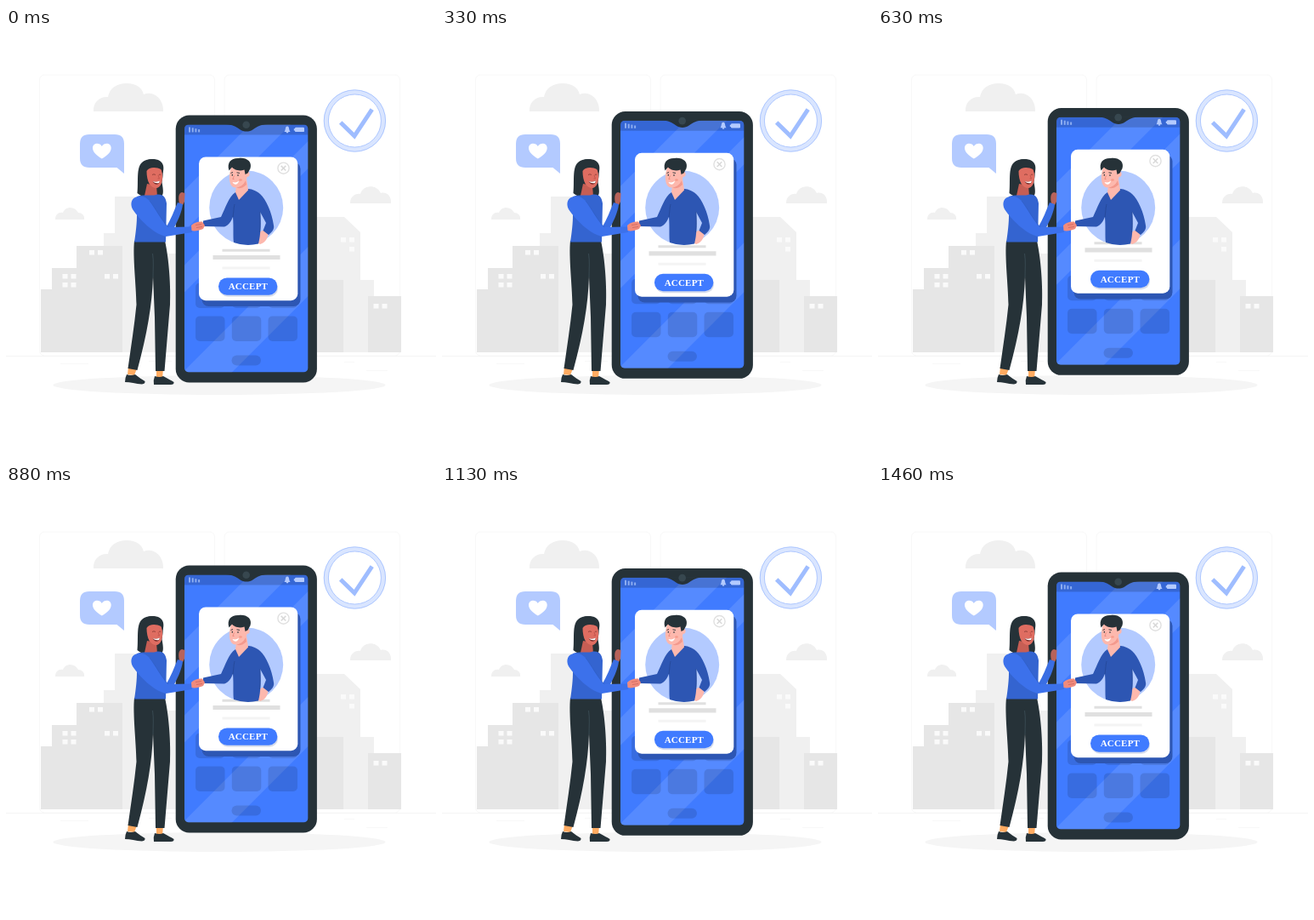
Write an HTML page with a canvas that moves like this. It is 506 by 504 pixels and loops after 1500 ms.

```html
<!DOCTYPE html>
<html lang="en">
<head>
<meta charset="utf-8">
<title>Friend request</title>
<style>
  html, body { margin: 0; width: 100%; height: 100%; overflow: hidden; background: #fff; }
  canvas { display: block; width: 506px; height: 504px; }
</style>
</head>
<body>
<canvas id="stage" width="506" height="504"></canvas>
<script>
const ctx = document.getElementById('stage').getContext('2d');

const LOOP = 1500, STEPS = 36, LIFT = 10, REST = 0.4;
const DARK = '#263238', BLUE = '#407bff', PALE = '#b3caff', NAVY = '#2d56b3';
const GREY = '#e6e6e6', MIST = '#f0f0f0', SKIN = '#fdb8ad', ROSE = '#df6d61';

function fill(path, color) {
  ctx.fillStyle = color;
  ctx.fill(new Path2D(path));
}

function line(path, color, width = 1) {
  ctx.strokeStyle = color;
  ctx.lineWidth = width;
  ctx.stroke(new Path2D(path));
}

function box(x, y, w, h, color, r = 0) {
  ctx.fillStyle = color;
  ctx.beginPath();
  ctx.roundRect(x, y, w, h, r);
  ctx.fill();
}

function oval(x, y, rx, ry, color) {
  ctx.fillStyle = color;
  ctx.beginPath();
  ctx.ellipse(x, y, rx, ry, 0, 0, Math.PI * 2);
  ctx.fill();
}

function ring(x, y, r, color, width) {
  ctx.strokeStyle = color;
  ctx.lineWidth = width;
  ctx.beginPath();
  ctx.arc(x, y, r, 0, Math.PI * 2);
  ctx.stroke();
}

function windows(...spots) {
  for (const [x, y] of spots) box(x, y, 6, 5.5, '#fafafa');
}

function drawCity() {
  for (const [x, w] of [[39.5, 206], [257, 206.5]]) {
    ctx.strokeStyle = '#f8f8f8';
    ctx.lineWidth = 1;
    ctx.beginPath();
    ctx.roundRect(x, 55, w, 330, 6);
    ctx.stroke();
  }

  fill('M103 98C102 88 110 80 120 81C122 70 131 65 142 65C153 65 160 70 162 78C174 73 186 84 185 98Z', MIST);
  fill('M58 225C58 219 62 216 67 217C70 209 81 209 85 217C89 217 93 220 92 225Z', MIST);
  fill('M405 206C405 198 411 194 417 195C420 184 436 183 441 194C448 192 454 198 453 206Z', MIST);

  box(115, 241, 22, 140, MIST);
  box(128, 198, 44, 183, MIST);
  box(172, 265, 38, 116, MIST);
  fill('M41 381V307H54V282H83V256H137V381Z', GREY);
  windows([98, 261], [108, 261], [66.5, 289], [76.5, 289], [66.5, 299], [76.5, 299], [116, 289], [126, 289]);

  fill('M360 381V222H398L417 240V296H433V381Z', MIST);
  box(360, 296, 37, 85, GREY);
  box(426, 315, 39, 66, GREY);
  windows([394, 246], [404, 246], [404, 257], [432.5, 324], [442.5, 324]);

  line('M0 385.5H506', '#f3f3f3', 0.8);
  line('M64 394.5H97M168 391.5H195M398 392.5H410M424 402.5H449', '#f6f6f6', 0.8);
  oval(251, 419.5, 195.5, 11.5, '#f5f5f5');
}

function drawBadges() {
  fill('M98 125H128Q139 125 139 136V171L130.500 164H98Q87 164 87 153V136Q87 125 98 125Z', PALE);
  fill('M112.8 153.6C107 150 102 146 102 141C102 135 110 134 112.8 139C116 134 123.7 135 123.7 141C123.7 146 119 150 112.8 153.6Z', '#fff');

  oval(410.4, 109, 36.5, 36.5, '#d9e5ff');
  oval(410.4, 109, 31, 31, '#fff');
  ring(410.4, 109, 36.2, '#9fbdff', 0.8);
  ring(410.4, 109, 31, '#9fbdff', 0.8);
  line('M393.7 111L410 126.800L430.700 95.700', '#9fbdff', 5);
}

// Diagonal reflection between the lines x + y = from and x + y = to.
function gloss(from, to) {
  fill(`M${from - 100} 100L${to - 100} 100L${to - 410} 410L${from - 410} 410Z`, 'rgba(255,255,255,.11)');
}

function drawPhone() {
  box(199.7, 102.2, 166.2, 313.8, DARK, 16);
  ctx.save();
  ctx.beginPath();
  ctx.roundRect(210, 113, 145.3, 291, 5);
  ctx.clip();
  box(210, 113, 146, 291, BLUE);
  gloss(400, 448);
  gloss(488, 520);
  gloss(612, 670);
  for (const y of [299, 338]) {
    for (const x of [223, 265.8, 308.5]) box(x, y, 34.5, 29.5, 'rgba(0,0,0,.12)', 5);
  }
  box(265.5, 384, 34.5, 12, 'rgba(0,0,0,.12)', 6);
  box(210, 113, 146, 12, 'rgba(0,0,0,.17)');
  ctx.restore();

  fill('M258 112.5C267 113 270 115 275 118.500C280 122 286 122 291 118.500C296 115 299 113 308 112.500Z', DARK);
  oval(282.7, 113.3, 4.3, 4.3, '#37474f');
  for (let i = 0; i < 4; i++) box(215 + i * 3.7, 116 + i * 0.9, 2, 6 - i * 0.9, '#8cacf0');
  fill('M327.3 121.5C329.5 120 328 115 331 115C334 115 332.500 120 334.700 121.500Z', PALE);
  oval(331, 122, 1.3, 0.9, PALE);
  box(340, 116.3, 11, 5.4, PALE, 1.2);
  box(338.8, 117.8, 1.5, 2.4, PALE);

  box(230.5, 157, 116, 169.7, NAVY, 8);
  box(227, 151, 116.3, 168.8, '#fff', 8);
}

function drawCardContent() {
  box(254.5, 259.3, 56, 3, '#e0e0e0');
  box(243.5, 266.5, 79, 5.2, '#e0e0e0');
  box(254.5, 280, 56, 3, '#f4f4f4');

  ring(326.5, 164.3, 6.6, '#e0e0e0', 1.4);
  line('M323.7 161.5L329.3 167.1M329.3 161.5L323.7 167.1', '#d8d8d8', 1.5);

  box(251, 295, 69, 20.3, '#d6dceb', 10);
  box(250, 293, 69.3, 20.3, BLUE, 10);
  ctx.fillStyle = '#fff';
  ctx.font = 'bold 11px "Liberation Serif", serif';
  ctx.letterSpacing = '0.2px';
  ctx.textAlign = 'center';
  ctx.fillText('ACCEPT', 284.9, 306.8);
}

function drawMan() {
  fill('M296 244C297 238 306 236 309 238C309 245 306 252 299 254L295 252Z', SKIN);
  fill('M270 193C262 198 258 212 253 222L232 226.500V233L257 233.500C262 232 265 227 267 222C268 234 267 246 268 252Q282 257 297 253.500C300 243 300 228 299 216L306 229L302.500 238L309 243C313 240 316 236 315 232C313 217 306 201 299 195C293 190 288 189 284 189Z', NAVY);
  line('M267 222C268 215 268 211 269 207M299 216C299 226 299.500 232 298.500 240', '#244793', 0.8);
  fill('M271 184L283 177L285 190.500L274 202L270 193Z', SKIN);
  fill('M271 187.500C277 186.500 280 183 282 179L283 184C279 188 275 189 271 187.500Z', '#f3998d');
  fill('M264 167C261.500 177 263 187 269.500 187.500C277 187.500 283 181 285 170L281 162H266Z', SKIN);
  oval(284.3, 171.8, 2.3, 3, SKIN);
  fill('M262.500 167.500C259.500 158 265 152.500 274 153C283 152 290 157 287.500 165L284.500 170.500L281.500 172L280.500 166.500C274 169 268 166 266 163.500Z', DARK);
  line('M264.500 170.500L267 169.500M271.500 169.800L275 170.500', DARK, 0.9);
  oval(266.300, 172.800, 0.7, 1, DARK);
  oval(273, 173, 0.7, 1, DARK);
  line('M268.500 173.500L266.800 177.500H268.500', '#e88476', 0.8);
  fill('M266.500 181C269.500 182 272 181.500 274 179.500C273.500 184 268.500 185.500 266.500 181Z', '#fff');
  oval(276, 178.500, 1.8, 1.2, '#f79b8c');
}

function drawWoman() {
  fill('M144 398L154 400L151 408L143 407Z', '#ffab61');
  fill('M177 400H185L184 412H177Z', '#ffab61');
  fill('M142 407Q147 409 152 407C156 410 160 413 163.500 415Q164 418 160 418.500C153 418 146 416 140 416Q140 411 142 407Z', DARK);
  fill('M175 409Q181 411 185 409C190 412 195 414 197.500 416Q198 419 194 419H174Q173 414 175 409Z', DARK);
  fill('M151 250H187C192 272 194 305 193 325L186.500 403H176L175 340L173 292C172 325 166 360 154.500 402L143.500 400C147 375 151 350 153.500 325C153 300 149 268 151 250Z', DARK);
  line('M172.500 265C174 274 173 284 173 293', '#455a64', 0.6);

  fill('M204 206C202.500 199 203 194 207 193L210.500 194L210 204L208 208Z', '#b8635a');
  fill('M188 235C194 225 198 214 202 205L208 207C207 217 201 229 196 238Z', '#3a6ee3');

  fill('M160 158C153 164 156 181 154.500 194C160 199 170 200 179 199.500C187 199 185 190 183.500 181C187 165 183 155 172.500 154Q164 154 160 158Z', DARK);
  fill('M166 183L177 185L178 198Q170 203 163 197Z', '#c75e54');
  fill('M154 198C162 195 172 198 178 195.500C185 195 188 199 189 206L188 251.500H151C153 238 154 229 154 220Z', '#3464d0');
  fill('M165.500 168C168 163 177 163 182.500 166C186 175 183.500 187.500 177 188C170 188 165.500 181 165.500 168Z', ROSE);
  fill('M162 182C162 168 166 163 174 162C180 162 183 165 184.500 171C188 158 181 154 172 154C159 154.500 155 169 158 183Z', DARK);
  line('M172 172.500Q174 171 176 172.500M179.800 172.500Q181.300 171.500 182.300 172.500', '#8f3f38', 0.9);
  line('M179 173L180.500 177H178.500', '#bd5047', 0.8);
  fill('M172.500 180Q177.500 181.500 181 179.500C180.500 185 174.500 185 172.500 180Z', '#7c2f2c');
  fill('M172.500 180Q177.500 181.500 181 179.500L180 182Q175.500 183 172.500 180Z', '#fff');

  fill('M155 198C148 199 145.500 206 149 213C158 226 173 241 188 245L219 240L218 233.500L191 234C183 226 176 212 169 203Q163 197 155 198Z', '#3c71eb');
  line('M169 203C176 212 183 226 191 234', '#2f5dc4', 0.7);

  fill('M218 232C221 228.500 226 227 231 227.500L234 232L232 236C227 238 222 239 218.500 238Z', '#f08b7d');
  line('M223 231.500L230 230.500M224 234.500L231 233.500', '#cf665c', 0.8);
}

function lift(ms) {
  const step = Math.floor((ms + 3.4) * STEPS / LOOP) % STEPS;
  const phase = step / (STEPS - 1);
  return LIFT * (1 - Math.abs(2 * phase - 1));
}

function raised(dy, draw) {
  ctx.save();
  ctx.translate(0, REST - dy);
  draw();
  ctx.restore();
}

const start = performance.now();

function render() {
  const dy = lift((performance.now() - start) % LOOP);
  box(0, 0, 506, 504, '#fff');
  drawCity();
  drawBadges();
  raised(dy, drawPhone);
  oval(282.7, 211, 43.5, 43.5, PALE);
  raised(dy, drawCardContent);
  drawMan();
  drawWoman();
  requestAnimationFrame(render);
}

render();
</script>
</body>
</html>
```
